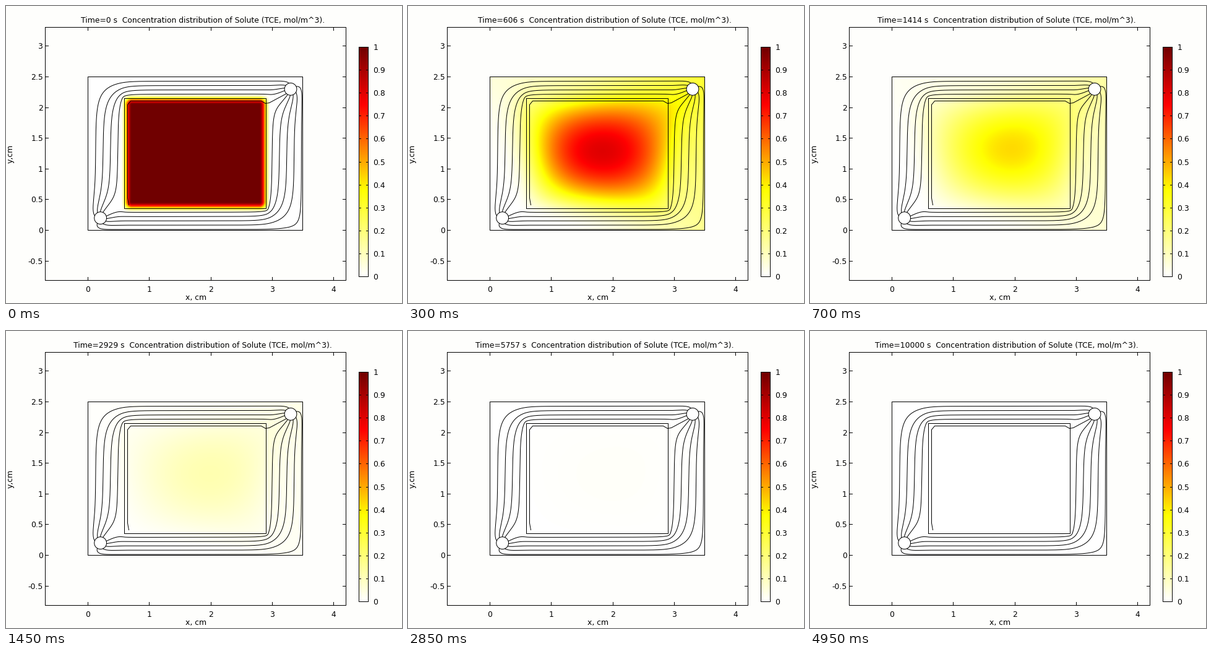
A matplotlib script for the animation above (5 s loop, 640x480 px).

```python
import numpy as np
import matplotlib.pyplot as plt
from matplotlib.animation import FuncAnimation
from matplotlib.colors import LinearSegmentedColormap
from matplotlib.patches import Circle

WIDTH, HEIGHT, DPI = 640, 480, 100
PX = 72 / DPI                       # one pixel in points
FRAMES, END_TIME = 100, 10000
PAPER = "#fefefc"

# Tank geometry in cm
TANK_W, TANK_H = 3.5, 2.5
BLOCK = (0.6, 2.9, 0.35, 2.15)
INLET, OUTLET, PORT_R = (0.2, 0.2), (3.3, 2.3), 0.1

# Transport model
CELL = 0.05
DIFFUSION = 2.8e-4
FLOW_RATE = 8.2e-3
BLOCK_PERMEABILITY = 0.0035
SUBSTEPS = 100

HEAT = LinearSegmentedColormap.from_list("heat", [
    (0, (1, 1, 1)), (0.375, (1, 1, 0)), (0.75, (1, 0, 0)), (1, (0.44, 0, 0))], N=512)


def to_px(x, y):
    return 132.3 + 99.15 * x, 362 - 99.2 * y


# ---------- flow ----------

def grid(cell):
    xs = np.arange(cell / 2, TANK_W, cell)
    ys = np.arange(cell / 2, TANK_H, cell)
    return np.meshgrid(xs, ys)


def divergence(u, v):
    out = np.zeros((v.shape[0] + 1, v.shape[1]))
    out[:, :-1] += u
    out[:, 1:] -= u
    out[:-1] += v
    out[1:] -= v
    return out


def port_share(centre):
    """Each cell's share of the flow through a round port."""
    x, y = grid(CELL)
    mask = np.hypot(x - centre[0], y - centre[1]) < PORT_R
    return mask / mask.sum()


def solve_flow(source):
    """Face fluxes of slow flow around a nearly sealed block."""
    x, y = grid(CELL)
    x0, x1, y0, y1 = BLOCK
    inside = (x > x0) & (x < x1) & (y > y0) & (y < y1)
    perm = np.where(inside, BLOCK_PERMEABILITY, 1.0)
    kx = 2 / (1 / perm[:, :-1] + 1 / perm[:, 1:])
    ky = 2 / (1 / perm[:-1] + 1 / perm[1:])

    def flux(p):
        return kx * (p[:, :-1] - p[:, 1:]), ky * (p[:-1] - p[1:])

    # conjugate gradients for the pressure
    p = np.zeros_like(source)
    res = source.copy()
    step = res.copy()
    rr = np.sum(res * res)
    for _ in range(2500):
        a_step = divergence(*flux(step))
        alpha = rr / np.sum(step * a_step)
        p += alpha * step
        res -= alpha * a_step
        rr_new = np.sum(res * res)
        if rr_new < 1e-20:
            break
        step = res + rr_new / rr * step
        rr = rr_new
    return flux(p)


def bilinear(f, gx, gy):
    gx = np.clip(gx, 0, f.shape[1] - 1.001)
    gy = np.clip(gy, 0, f.shape[0] - 1.001)
    i, j = gx.astype(int), gy.astype(int)
    a, b = gx - i, gy - j
    return ((1 - b) * ((1 - a) * f[j, i] + a * f[j, i + 1])
            + b * ((1 - a) * f[j + 1, i] + a * f[j + 1, i + 1]))


def trace(u, v, seeds, step, count=450):
    """Follow the flow from every seed until it meets a port."""
    u = np.pad(u, ((0, 0), (1, 1)))
    v = np.pad(v, ((1, 1), (0, 0)))

    def heading(pos):
        gx, gy = pos.T / CELL
        d = np.stack([bilinear(u, gx, gy - 0.5), bilinear(v, gx - 0.5, gy)], axis=1)
        return d / (np.hypot(*d.T)[:, None] + 1e-12)

    pos = seeds
    path = [pos]
    for _ in range(count):
        gap = np.minimum(np.hypot(*(pos - INLET).T), np.hypot(*(pos - OUTLET).T))
        moving = (gap > PORT_R * 0.9)[:, None]
        middle = pos + step / 2 * heading(pos)
        pos = np.clip(pos + moving * step * heading(middle), 0, (TANK_W, TANK_H))
        path.append(pos)
    return np.array(path)


# ---------- concentration ----------

def ramp(depth):
    s = np.clip((depth + 0.07) / 0.18, 0, 1)
    return s * s * (3 - 2 * s)


def initial(x, y):
    x0, x1, y0, y1 = BLOCK
    return ramp(x - x0) * ramp(x1 - x) * ramp(y - y0) * ramp(y1 - y)


def simulate(u, v, sink):
    u_fwd, u_back = np.maximum(u, 0) + DIFFUSION, np.maximum(-u, 0) + DIFFUSION
    v_fwd, v_back = np.maximum(v, 0) + DIFFUSION, np.maximum(-v, 0) + DIFFUSION
    rate = END_TIME / (FRAMES - 1) / SUBSTEPS / CELL ** 2
    fresh = port_share(INLET) > 0

    c = initial(*grid(CELL))
    fields = [initial(*grid(CELL / 5))]
    for _ in range(FRAMES - 1):
        for _ in range(SUBSTEPS):
            fu = u_fwd * c[:, :-1] - u_back * c[:, 1:]
            fv = v_fwd * c[:-1] - v_back * c[1:]
            c -= rate * (divergence(fu, fv) + sink * c)
            c[fresh] = 0
        fields.append(c.copy())
    return fields


# ---------- drawing ----------

fig = plt.figure(figsize=(WIDTH / DPI, HEIGHT / DPI), dpi=DPI, facecolor=PAPER)
ax = fig.add_axes([0, 0, 1, 1])
ax.axis("off")


def line(xs, ys):
    ax.plot(xs, ys, color="black", lw=PX, snap=False, zorder=2)


def box(x0, y0, x1, y1):
    line([x0, x1, x1, x0, x0], [y0, y0, y1, y1, y0])


def label(x, y, text, ha="center", **kw):
    return ax.text(x, y, text, ha=ha, va="baseline", color="black",
                   family="DejaVu Sans", fontsize=12.45 * PX, **kw)


def draw_streams(u, v):
    x0, _, y0, _ = BLOCK
    left = [(x0 * k / 5, 1.13) for k in range(1, 5)]
    below = [(1.7, y0 * (0.84 - k / 5)) for k in range(5)]
    seeds = np.array(left + below)
    path = np.concatenate([trace(u, v, seeds, -0.015)[::-1], trace(u, v, seeds, 0.015)])
    for k in range(len(seeds)):
        line(*to_px(*path[:, k].T))
    # slow line just inside the block
    line([198, 196, 196, 201, 412, 419, 425, 453], [321, 310, 159, 153, 153, 157, 156, 141])


def draw_tank():
    box(132, 114, 479, 362)
    box(191, 149, 420, 327)
    for port in (INLET, OUTLET):
        ax.add_patch(Circle(to_px(*port), 9.9, facecolor="white", edgecolor="black",
                            lw=PX, zorder=3))


def draw_axes():
    left, top, right, bottom = 63, 34, 549, 443
    box(left, top, right, bottom)
    for value in range(5):
        x = round(to_px(value, 0)[0])
        line([x, x], [bottom, bottom - 5])
        line([x, x], [top, top + 5])
        label(x, 461, f"{value}")
    for value in np.arange(-0.5, 3.1, 0.5):
        y = round(to_px(0, value)[1])
        line([left, left + 5], [y, y])
        line([right, right - 5], [y, y])
        label(59.5, y + 4.5, f"{value:g}", ha="right")
    label(307, 474, "x, cm")
    label(10.5, 238, "y,cm", rotation=90, rotation_mode="anchor")


def draw_colorbar():
    left, top, right, bottom = 570, 66, 585, 437
    ax.imshow(np.linspace(0, 1, 372)[:, None], cmap=HEAT, vmin=0, vmax=1, aspect="auto",
              origin="lower", extent=(left, right, bottom, top), zorder=1)
    box(left, top, right, bottom)
    for k in range(11):
        y = round(bottom - (bottom - top) * k / 10)
        line([left, left + 3], [y, y])
        line([right, right - 3], [y, y])
        label(593, y + 4.5, f"{k / 10:g}", ha="left")


sink = FLOW_RATE * port_share(OUTLET)
flow = solve_flow(FLOW_RATE * port_share(INLET) - sink)
fields = simulate(*flow, sink)

field = ax.imshow(fields[0], cmap=HEAT, vmin=0, vmax=1, aspect="auto", origin="lower",
                  interpolation="bilinear", extent=(132, 479, 362, 114), zorder=1)
draw_streams(*flow)
draw_tank()
draw_axes()
draw_colorbar()
title = label(317.3, 25.5, "")
ax.set_xlim(-0.5, WIDTH - 0.5)
ax.set_ylim(HEIGHT - 0.5, -0.5)


def update(i):
    field.set_data(fields[i])
    seconds = i * END_TIME // (FRAMES - 1)
    title.set_text(f"Time={seconds} s  Concentration distribution of Solute (TCE, mol/m^3).")
    return field, title


anim = FuncAnimation(fig, update, frames=FRAMES, interval=50, repeat=True, repeat_delay=0)
plt.show()
```
